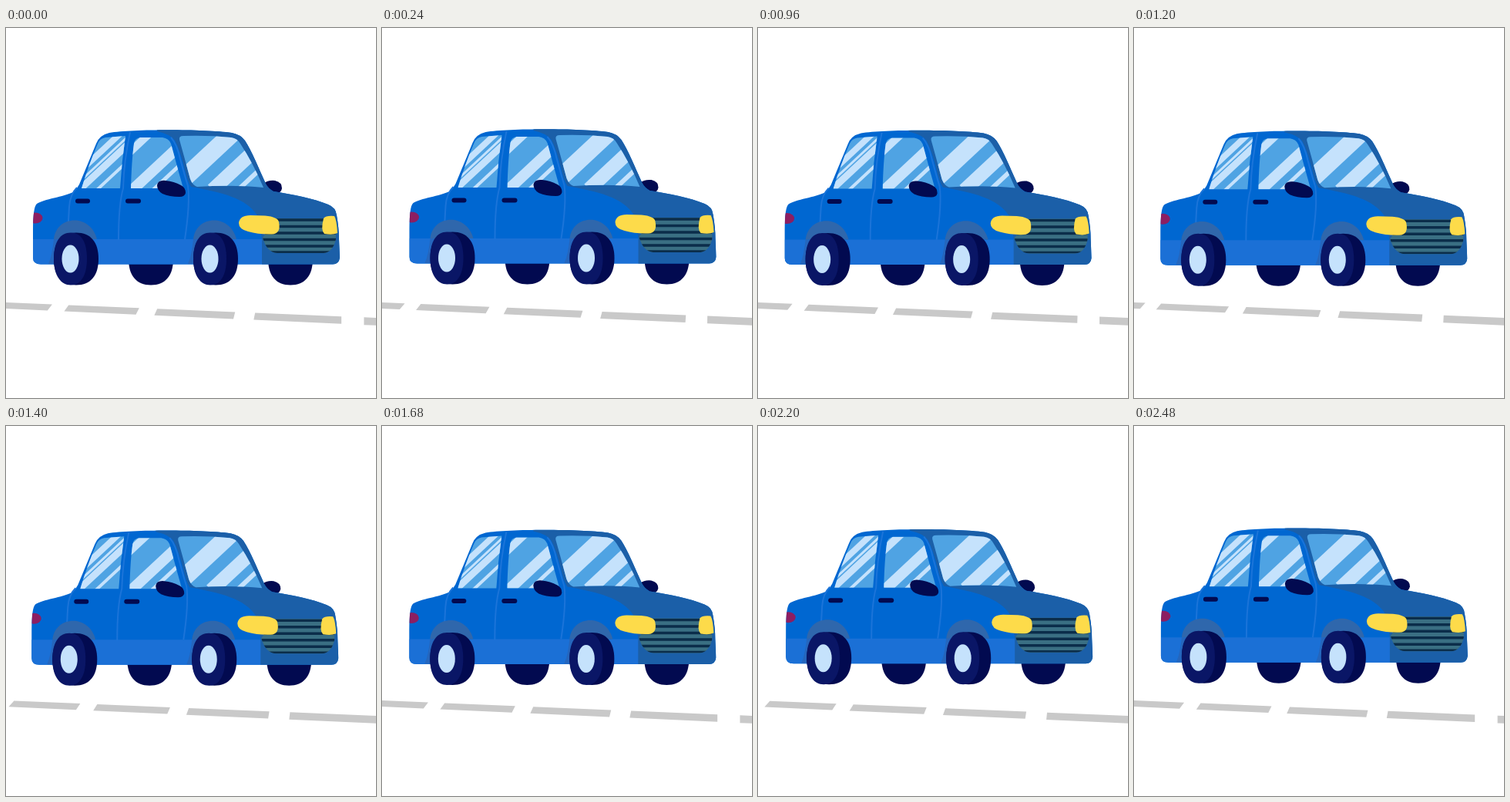
An HTML page that plays this animation: 480x480 px, repeating every 2.52 s.

```html
<!DOCTYPE html>
<html lang="en">
<head>
<meta charset="utf-8">
<title>Blue car</title>
<style>
  html, body { margin: 0; width: 100%; height: 100%; overflow: hidden; background: #fff; }
  svg { display: block; width: 100vw; height: 100vh; }
  .line { fill: none; stroke: #1b74d9; stroke-width: 2; }
  .shine { fill: none; stroke: #c5e2fc; }
  .glass { fill: #4fa3e3; }
  .navy { fill: #020a50; }
  .front { fill: #1b5fa8; }
  .lamp { fill: #fddb4a; }
</style>
</head>
<body>
<svg viewBox="0 0 480 480">
  <defs>
    <path id="body" d="M35 298V262Q35 232 40 228C49 222 75 219 87 213Q92 209 95 203L117 150Q121 139 134 136C165 131 255 131 293 136Q304 138 310 146C319 160 327 180 337 202Q340 208 347 212C372 216 399 221 418 229Q428 233 429 243Q432 260 432 274L433 298Q432 306.5 424 306.5H45Q35 306.5 35 298Z"/>
    <path id="rearGlass" d="M98 208Q107 178 119 150Q122 143 129 142L155 140Q150 174 148 208Z"/>
    <path id="doorGlass" d="M162 208Q163 171 166 150Q167 143 174 142L203 142Q211 143 214 150Q222 180 230 208Z"/>
    <path id="windshield" d="M225 145Q224 140 230 140Q263 139 292 142Q300 143 304 150Q321 176 334 207Q295 203 248 206Q242 204 239 196Q232 170 225 145Z"/>
    <path id="grille" d="M350 247H415L428 268V274Q424 291 412 292H352Q338 291 333 272Z"/>
    <path id="tire" d="M62 299.5C62 278 72 265.5 91 265.5S120 278 120 299.5 110 333.5 91 333.5 62 321 62 299.5Z"/>
    <clipPath id="inBody"><use href="#body"/></clipPath>
    <clipPath id="inRear"><use href="#rearGlass"/></clipPath>
    <clipPath id="inDoor"><use href="#doorGlass"/></clipPath>
    <clipPath id="inShield"><use href="#windshield"/></clipPath>
    <clipPath id="inGrille"><use href="#grille"/></clipPath>
    <g id="arch">
      <path fill="#2566bd" d="M55 306Q60 295 62 274H90V306Z"/>
      <path fill="#2f67ac" d="M62 274C65 243 109 240 118 274Z"/>
    </g>
    <g id="wheel">
      <use href="#tire" class="navy"/>
      <path fill="#0a1666" d="M62 299.5C62 278 70 265.5 84 265.5S105 278 105 299.5 97 333.5 84 333.5 62 321 62 299.5Z"/>
      <ellipse cx="83.5" cy="299.5" rx="11" ry="18" fill="#c5e2fc"/>
    </g>
  </defs>

  <path id="road" fill="#c9c9c9"/>

  <g id="car">
    <path class="navy" d="M334 202Q340 197 349 198Q358 200 358 208Q357 214 350 215L336 212Z"/>
    <use href="#tire" class="navy" x="97"/>
    <use href="#tire" class="navy" x="278"/>
    <use href="#body" fill="#0067d1"/>
    <g clip-path="url(#inBody)">
      <path fill="#1b70d6" d="M30 274H340V310H30Z"/>
      <path class="front" d="M196 130H310L350 210L440 230V310H332V274Q330 255 326 243C312 221 280 213 240 206Q235 198 232 184Q226 159 219 146Q214 138 196 134Z"/>
      <ellipse cx="38" cy="246.5" rx="9.5" ry="7" fill="#8c1e62"/>
    </g>
    <path class="line" d="M92 207Q83 216 82 232T80 272M161 135Q153 172 152 208Q146 229 146 275M214 142Q222 151 226 170Q232 192 236 205Q239 228 232 274"/>
    <use href="#arch"/>
    <use href="#arch" x="181"/>

    <use href="#rearGlass" class="glass"/>
    <g class="shine" clip-path="url(#inRear)">
      <path stroke-width="8" d="M70 210l90 -84"/>
      <path stroke-width="3" d="M84 210l90 -84"/>
      <path stroke-width="9" d="M95 210l90 -84"/>
      <path stroke-width="4" d="M118 210l90 -84"/>
    </g>
    <use href="#doorGlass" class="glass"/>
    <g class="shine" clip-path="url(#inDoor)">
      <path stroke-width="10" d="M108 210l90 -84"/>
      <path stroke-width="14" d="M164 210l90 -84"/>
      <path stroke-width="5" d="M191 210l90 -84"/>
    </g>
    <use href="#windshield" class="glass"/>
    <g class="shine" clip-path="url(#inShield)">
      <path stroke-width="23" d="M215 210l90 -84"/>
      <path stroke-width="18" d="M268 210l90 -84"/>
      <path stroke-width="6" d="M301 210l90 -84"/>
    </g>

    <path class="navy" d="M196 204Q197 197 207 198Q218 199 227 204Q233 207 233 214Q232 219 225 219Q212 219 203 215Q196 211 196 204Z"/>
    <rect class="navy" x="90" y="221.5" width="19" height="6" rx="3"/>
    <rect class="navy" x="155" y="221.5" width="20" height="6" rx="3"/>

    <use href="#grille" fill="#3a6f83"/>
    <path clip-path="url(#inGrille)" stroke="#0b2d4a" stroke-width="3.5" d="M330 249H432M330 257.5H432M330 266H432M330 274.5H432M330 283H432M330 291H432"/>
    <path class="lamp" d="M302 253Q303 243 317 243L336 243.5Q353 245 354 252Q357 267 345 267.5Q328 268 314 264Q302 261 302 253Z"/>
    <path class="lamp" d="M412 247Q415 243 426 244Q429 249 430 266Q424 269 413 267Q408 262 412 247Z"/>
    <use href="#wheel"/>
    <use href="#wheel" x="181"/>
  </g>
</svg>
<script>
  const LOOP = 2520, DASH_TIME = 840, BOB_TIME = 252, DASH_LENGTH = 0.804;
  const road = document.getElementById('road');
  const car = document.getElementById('car');

  // Perspective position of a point on the lane marking.
  const laneX = u => 75.6 + 50540 * (1 / (21.3 - u) - 1 / 21.3);
  const topY = x => 356 + 0.0417 * x;
  const bottomY = x => 364 + 0.0455 * x;
  const lean = x => x + Math.max(0, 435 - x) * 0.016;
  const point = (x, y) => `${x.toFixed(2)} ${y.toFixed(2)}`;

  function dash(u) {
    const left = laneX(u), right = laneX(u + DASH_LENGTH);
    const topLeft = lean(left), topRight = lean(right);
    return 'M' + point(topLeft, topY(topLeft)) + 'L' + point(topRight, topY(topRight)) +
      'L' + point(right, bottomY(right)) + 'L' + point(left, bottomY(left)) + 'Z';
  }

  function carOffset(t) {
    const wave = 1 + 2.2 * Math.cos((t - 135) / BOB_TIME * 2 * Math.PI);
    const y = wave * Math.min(1, t / 200);
    const drift = t > 1440 && t < 2480 ? 3.8 * Math.sin((t - 1440) / 1040 * Math.PI) ** 2 : 0;
    return [drift - 0.55 * y, y];
  }

  function draw(now) {
    const t = now % LOOP;
    const phase = t / DASH_TIME % 1;
    let path = '';
    for (let n = -2; n < 5; n++) path += dash(n - phase);
    road.setAttribute('d', path);
    car.setAttribute('transform', `translate(${carOffset(t).join(' ')})`);
    requestAnimationFrame(draw);
  }
  draw(performance.now());
</script>
</body>
</html>
```
